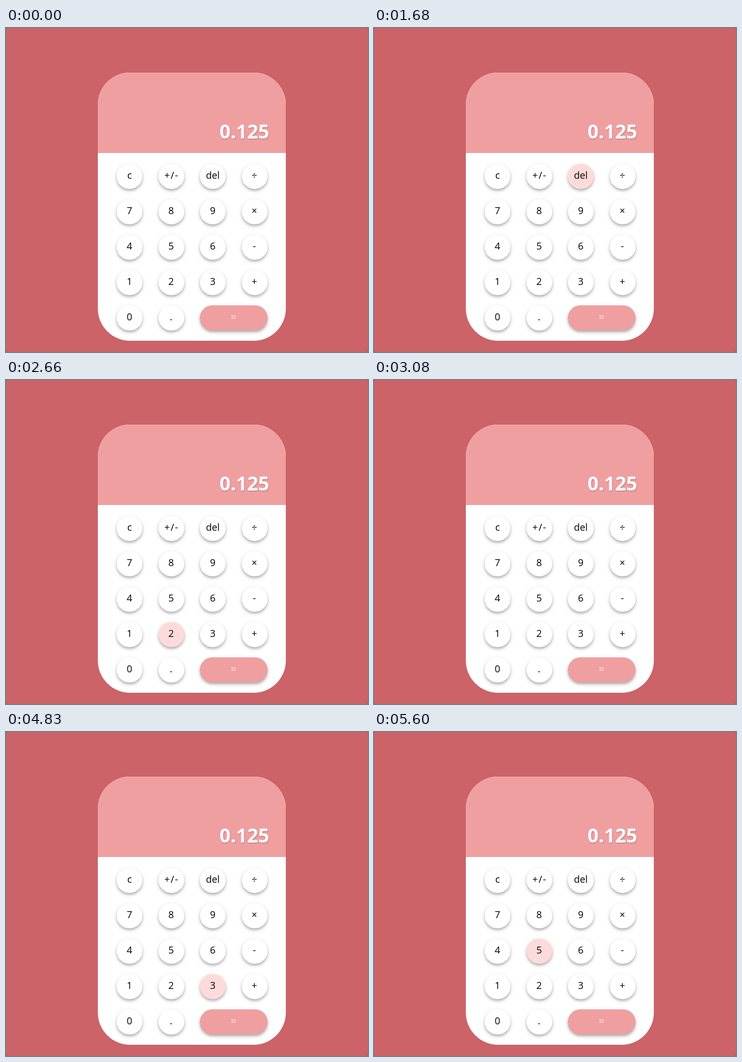
Recreate the animation shown at these times as an HTML page. Size 674 by 604 pixels, loop 5.74 s.

```html
<!DOCTYPE html>
<html lang="en">
<head>
<meta charset="utf-8">
<title>Calculator</title>
<style>
  html, body { margin: 0; width: 100%; height: 100%; overflow: hidden; background: #6b3f42; }
  .stage {
    position: absolute; left: 0; top: 0; width: 674px; height: 604px;
    overflow: hidden; border-radius: 2px; background: #cb6369;
    font-family: "Open Sans", "Noto Sans", sans-serif;
  }
  .card {
    position: absolute; left: 171px; top: 83px; width: 350px; height: 500px;
    overflow: hidden; border-radius: 60px; background: #fff;
  }
  .display { height: 150px; background: #ef9f9f; }
  .value {
    position: absolute; right: 31px; top: 85px;
    font-size: 36px; font-weight: 700; line-height: 50px;
    color: #fafafa; text-shadow: 1px 2px 2px rgba(0, 0, 0, .14);
  }
  .key {
    position: absolute; width: 48px; height: 46.5px; border-radius: 24px;
    background: #fff; color: #000; text-align: center;
    font-size: 18px; font-weight: 500; line-height: 42px;
    box-shadow: 0 3px 4px rgba(0, 0, 0, .24), 0 3px 10px rgba(0, 0, 0, .12);
  }
  .sign { letter-spacing: 1.5px; text-indent: 1.5px; }
  .equals { width: 125.5px; background: #ef9f9f; color: #fff; }
  .key.hover { background: #fedbdb; }
</style>
</head>
<body>
<div class="stage">
  <div class="card">
    <div class="display"><div class="value">0.125</div></div>
  </div>
</div>
<script>
  const LOOP = 5740;
  const rows = ["c +/- del ÷", "7 8 9 ×", "4 5 6 -", "1 2 3 +", "0 . ="];

  // Which key the pointer enters at each time in ms; "" means none.
  const visits = [
    [0, ""], [1260, "c"], [1540, "+/-"], [1610, ""], [1680, "del"], [1820, "÷"], [1960, ""],
    [2170, "9"], [2240, "8"], [2310, ""], [2450, "4"], [2520, ""],
    [2660, "2"], [2800, ""], [2870, "."], [3010, "="], [3080, ""],
    [3150, "6"], [3290, "×"], [3360, ""],
    [3850, "1"], [4130, ""], [4200, "2"], [4550, "3"], [4760, ""], [4830, "3"], [4900, ""],
    [4970, "6"], [5110, ""], [5180, "6"], [5250, ""],
    [5390, "5"], [5530, ""], [5600, "5"]
  ];

  const card = document.querySelector(".card");
  const keys = {};

  rows.forEach((row, r) => row.split(" ").forEach((label, c) => {
    const key = document.createElement("div");
    key.className = "key";
    if (label === "=") key.classList.add("equals");
    if (label === "+/-") key.classList.add("sign");
    key.textContent = label;
    key.style.left = 35 + 77.5 * c + "px";
    key.style.top = 170 + 66 * r + "px";
    card.append(key);
    keys[label] = key;
  }));

  const start = performance.now();
  let current = "";

  function draw() {
    const t = (performance.now() - start) % LOOP;
    const next = visits.findLast(([time]) => time <= t)[1];
    if (next !== current) {
      keys[current]?.classList.remove("hover");
      keys[next]?.classList.add("hover");
      current = next;
    }
    requestAnimationFrame(draw);
  }
  draw();
</script>
</body>
</html>
```
